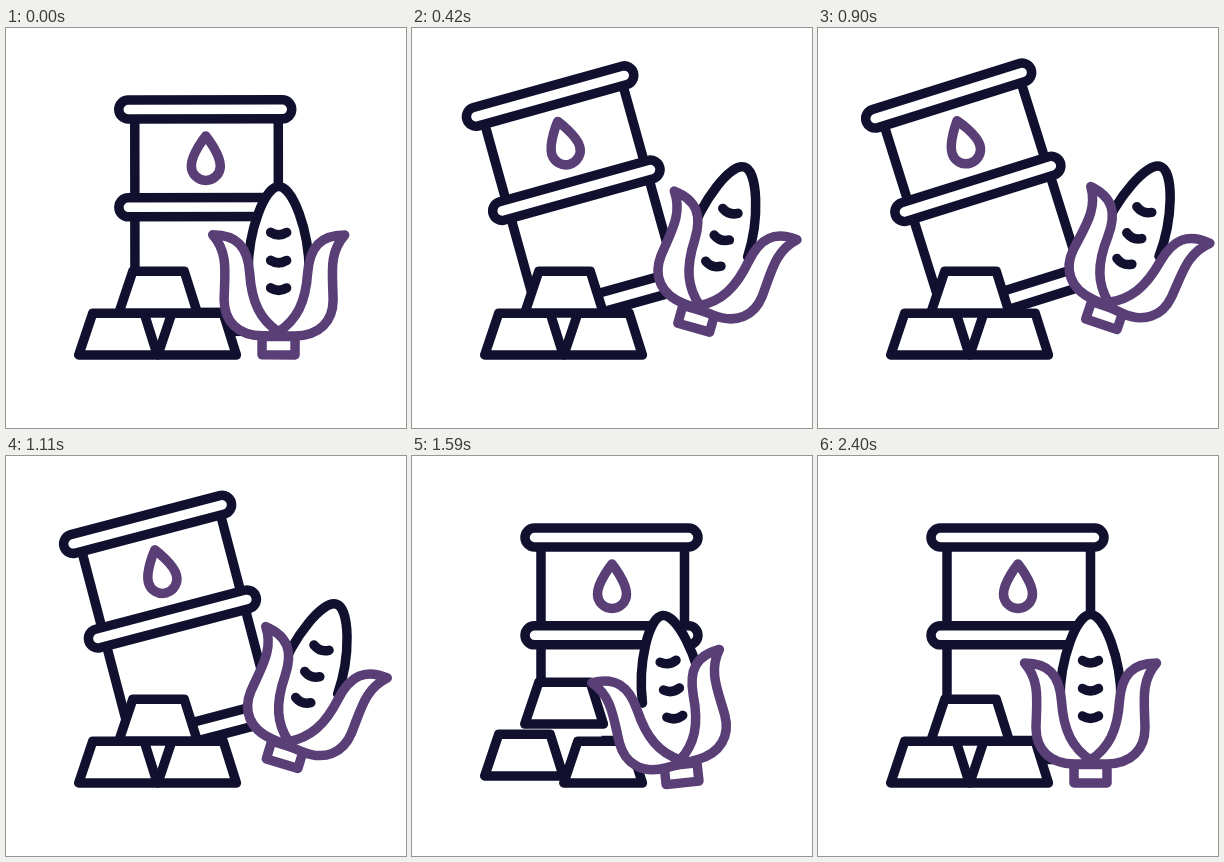
These frames come from a looping animation (400 px wide and 400 px high, 2430 ms). An HTML page with a canvas:

```html
<!DOCTYPE html>
<html lang="en">
<head>
<meta charset="utf-8">
<title>Commodities</title>
<style>
  html, body { margin: 0; width: 100%; height: 100%; overflow: hidden; background: #fff; }
  canvas { display: block; width: 100vw; height: 100vh; }
</style>
</head>
<body>
<canvas id="stage"></canvas>
<script>
const SIZE = 400, LOOP = 2430;
const DARK = '#11112f', PURPLE = '#5a3f77';
const canvas = document.getElementById('stage');
const ctx = canvas.getContext('2d');
const scale = window.devicePixelRatio || 1;
canvas.width = canvas.height = SIZE * scale;

const easeOut = u => 1 - (1 - u) ** 3;
const easeIn = u => u ** 3;
const easeBoth = u => u < 0.5 ? 4 * u ** 3 : 1 - 4 * (1 - u) ** 3;
const sine = u => (1 - Math.cos(Math.PI * u)) / 2;

// Each key is [time, value, easing towards this key].
function track(...keys) {
  return t => {
    const next = keys.findIndex(k => k[0] > t);
    if (next < 0) return keys[keys.length - 1][1];
    if (next === 0) return keys[0][1];
    const [t0, v0] = keys[next - 1], [t1, v1, ease = sine] = keys[next];
    return v0 + (v1 - v0) * ease((t - t0) / (t1 - t0));
  };
}

const barrelTurn = track([0, 0], [800, -17.4, easeOut], [900, -17.4], [1292, 0, easeIn]);
const corn = {
  x: track([0, 272.5], [900, 291, easeOut], [930, 291], [1360, 270], [1590, 268], [1880, 277], [2280, 272.5]),
  y: track([0, 303], [800, 273.5, easeOut], [900, 273.5], [1400, 303]),
  turn: track([0, 0], [900, 21, easeOut], [930, 21], [1650, -7, easeBoth], [1880, 2.5], [2280, 0]),
  leaves: track([0, 0], [900, 25.5, easeOut], [930, 25.5], [1650, -14.8, easeBoth], [1890, 3.2], [2300, 0])
};
const bars = [
  { x: 72.7, y: 327, lift: track([1170, 0], [1500, -7.5], [1590, -7], [2300, 0]) },
  { x: 151.8, y: 327, lift: track([1170, 0], [1350, -1.6], [1570, 0]) },
  { x: 112.8, y: 285, lift: track([1170, 0], [1600, -17], [2300, 0]) }
];

const drop = new Path2D('M200 108C200 108 185.5 126 185.5 138a14.5 14.5 0 0 0 29 0C214.5 126 200 108 200 108Z');
const bar = new Path2D('M0 0L14 -41.7H65.5L78.6 0Z');
const stackBacking = new Path2D('M72.7 327L87 285H113L127 243H178L191 285H217L230 327Z');

// Corn parts are drawn around the point where the leaves meet.
const cobFill = new Path2D('M-30.5 -60C-30.5 -100 -14 -144.5 0 -144.5S30.5 -100 30.5 -60C28 -30 17 -11 0 0C-17 -11 -28 -30 -30.5 -60Z');
const cobLine = new Path2D('M-30.5 -60C-30.5 -100 -14 -144.5 0 -144.5S30.5 -100 30.5 -60');
const kernel = new Path2D('M-8 -1.5Q0 3.5 8 -1.5');
const leaf = new Path2D('M-66 -96C-42 -96 -31 -84 -29 -58C-27 -28 -18 -11 0 1L0 5H-16C-41 5 -54.5 -10 -54.5 -31C-54 -58 -50 -78 -66 -96Z');
const stem = new Path2D('M-16.5 5.5H16.5V24H-16.5Z');

function fillWhite(path) {
  ctx.fillStyle = '#fff';
  ctx.fill(path);
}

function outline(path, color) {
  ctx.strokeStyle = color;
  ctx.stroke(path);
}

function draw(path, color) {
  fillWhite(path);
  outline(path, color);
}

function at(x, y, degrees, paint) {
  ctx.save();
  ctx.translate(x, y);
  ctx.rotate(degrees * Math.PI / 180);
  paint();
  ctx.restore();
}

function drawBarrel() {
  const body = new Path2D();
  body.rect(129, 81, 143.5, 213);
  draw(body, DARK);
  for (const y of [72, 169.8, 284.5]) {
    const band = new Path2D();
    band.roundRect(113, y, 173, 19, 9.5);
    draw(band, DARK);
  }
  draw(drop, PURPLE);
}

function drawCorn(t) {
  const x = corn.x(t), y = corn.y(t), turn = corn.turn(t);
  at(x, y, turn * 0.88, () => draw(stem, PURPLE));
  at(x, y, turn, () => {
    fillWhite(cobFill);
    outline(cobLine, DARK);
    for (const row of [-97, -69, -41.5]) at(0, row, 0, () => outline(kernel, DARK));
  });
  at(x, y, corn.leaves(t), () => {
    draw(leaf, PURPLE);
    ctx.scale(-1, 1);
    draw(leaf, PURPLE);
  });
}

function render(t) {
  ctx.setTransform(scale, 0, 0, scale, 0, 0);
  ctx.fillStyle = '#fff';
  ctx.fillRect(0, 0, SIZE, SIZE);
  ctx.lineWidth = 9.5;
  ctx.lineCap = ctx.lineJoin = 'round';
  at(119.5, 299.5, barrelTurn(t), () => {
    ctx.translate(-119.5, -299.5);
    drawBarrel();
  });
  fillWhite(stackBacking);
  for (const { x, y, lift } of bars) at(x, y + lift(t), 0, () => draw(bar, DARK));
  drawCorn(t);
}

const start = performance.now();
function tick() {
  render((performance.now() - start) % LOOP);
  requestAnimationFrame(tick);
}
tick();
</script>
</body>
</html>
```
